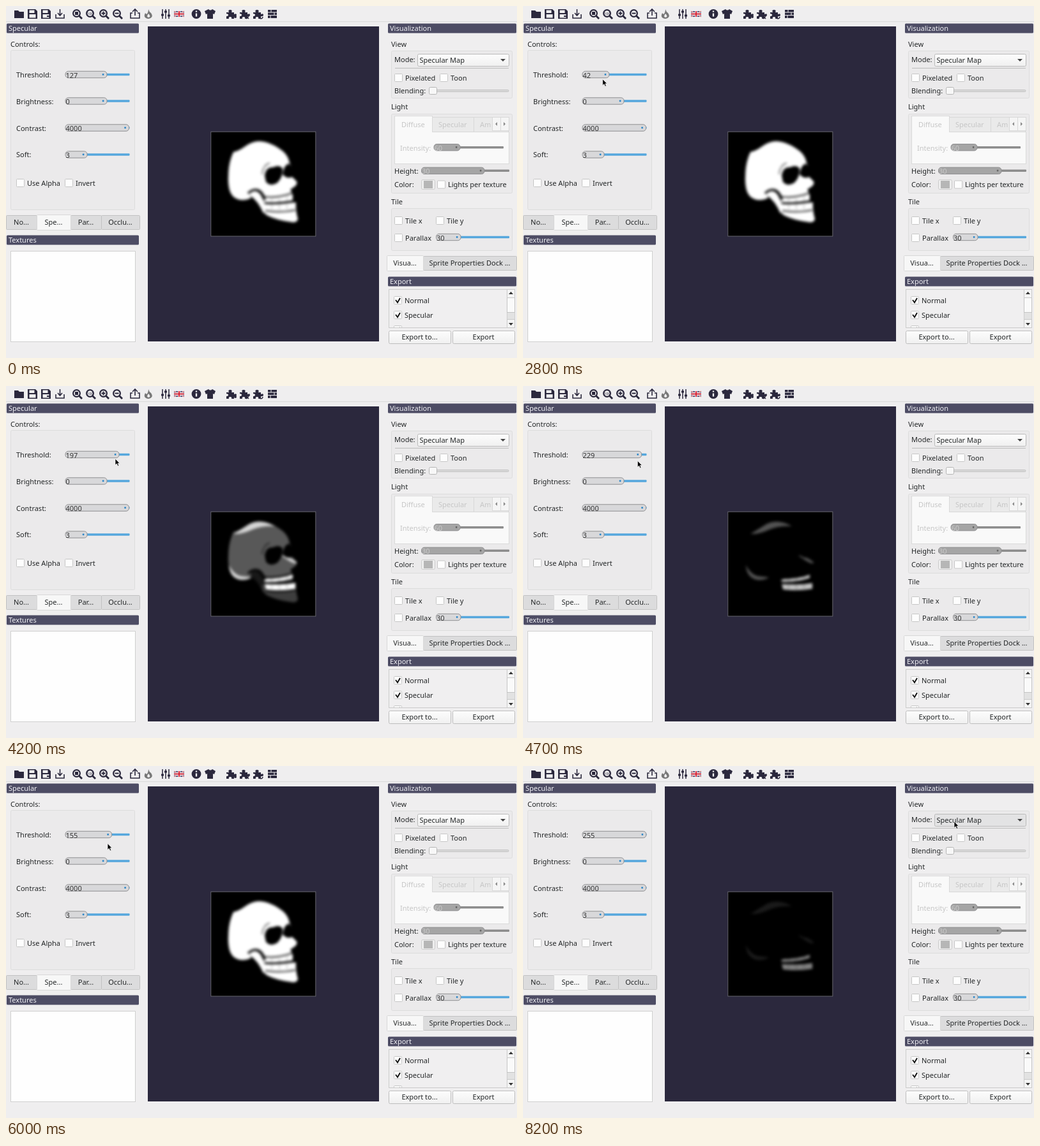
An HTML page that plays this animation: 800x552 px, repeating every 8300 ms.

```html
<!DOCTYPE html>
<html lang="en">
<head>
<meta charset="utf-8">
<title>Specular map threshold</title>
<style>
  html, body { margin: 0; width: 100%; height: 100%; overflow: hidden; background: #efeeef; }
  svg { display: block; width: 100%; height: 100%; }
  text { font: 11px "Noto Sans", sans-serif; fill: #232627; white-space: pre; }
</style>
</head>
<body>
<svg id="stage" viewBox="0 0 800 552" xmlns="http://www.w3.org/2000/svg"></svg>
<script>
const LOOP = 8300, STEP = 100;
const INK = '#2b283d', BLUE = '#55a7dd', PAPER = '#efeeef', PALE = '#c6c6c6';

// ---- markup helpers ----
const rect = (x, y, w, h, fill, stroke = 'none', r = 0, extra = '') =>
  `<rect x="${x}" y="${y}" width="${w}" height="${h}" rx="${r}" fill="${fill}" stroke="${stroke}" ${extra}/>`;
const path = (d, fill = INK, stroke = 'none', width = 1, extra = '') =>
  `<path d="${d}" fill="${fill}" stroke="${stroke}" stroke-width="${width}" ${extra}/>`;
const line = (d, color = INK, width = 1.6, extra = '') => path(d, 'none', color, width, extra);
const circle = (x, y, r, fill, stroke = 'none', width = 1) =>
  `<circle cx="${x}" cy="${y}" r="${r}" fill="${fill}" stroke="${stroke}" stroke-width="${width}"/>`;
const label = (x, y, str, color = '#232627', anchor = 'start') =>
  `<text x="${x}" y="${y}" text-anchor="${anchor}" style="fill:${color}">${str}</text>`;
const group = (x, y, w, h) => rect(x + .5, y + .5, w, h, '#ebeaeb', '#dcdcdc', 2);
const titleBar = (x, y, w, str) => rect(x, y + .5, w, 15, '#4d4c64', 'none', 1.5) + label(x + 3, y + 12, str, '#f1f1f5');
const button = (x, y, w, str) =>
  rect(x + .5, y + .5, w, 20, 'url(#sheen)', '#bdbdbd', 2) + label(x + w / 2, y + 14, str, undefined, 'middle');
const check = (x, y, str, on) => rect(x + .5, y + .5, 12, 12, '#fdfdfd', '#c6c6c6', 1) +
  (on ? line(`M${x + 3} ${y + 6}l3 4 4-7`, '#111', 1.9) : '') + label(x + 17, y + 10.5, str);
const tab = (x, y, w, h, str, selected) =>
  rect(x + .5, y + .5, w, h, selected ? '#f7f7f7' : '#dcdcdd', selected ? '#d8d8d8' : '#c2c2c2', 1) +
  label(x + w / 2, y + (selected ? 16 : 15), str, undefined, 'middle');

// Slider with its value written inside the filled capsule
function slider(id, x, y, end, dot, value, disabled) {
  const tint = disabled ? '#8c8c8c' : BLUE;
  return `<g id="${id}">` + rect(x + 4, y - 1.7, end - x - 4, 3.4, tint, 'none', 1) +
    rect(x, y - 5.2, dot + 6 - x, 10.4, disabled ? '#a5a5a5' : '#d8d8da', '#8f8f91', 4.5, 'class="capsule"') +
    rect(dot - 1.2, y - 1.6, 2.6, 2.8, disabled ? '#666' : '#2c86c8', 'none', .8, 'class="dot"') +
    `<text x="${x + .5}" y="${y + 5}" style="fill:${disabled ? '#c9c9c9' : '#333'}">${value}</text></g>`;
}

// ---- toolbar ----
const floppy = x => path(`M${x} 5h12l3 3v12h-15z`) + rect(x + 2.5, 6.5, 8, 4.5, PAPER) +
  rect(x + 2.5, 13, 10, 5.5, PAPER);
const lens = x => circle(x + 6.5, 11.5, 5.4, 'none', INK, 2.2) + line(`M${x + 10.5} 15.500l4.500 4.500`, INK, 2.8);
const puzzle = x => path(`M${x} 10h4q-2-4 2-4t2 4h4v3q4-2 4 1t-4 2v4h-4q1-3-2-3t-2 3h-4v-4q3 0 3-2t-3-2z`);
const toolbar = () =>
  path('M13 7h6l2 2h7v10h-15z') +
  floppy(34) + floppy(55) + line('M64 16h6', INK, 2) +
  line('M78 13v6h13v-6M84.500 5v9M81 11l3.500 4 3.500-4') +
  [104, 125, 146, 167].map(lens).join('') +
  rect(108, 9, 5, 5, INK) + label(126.5, 14, '<tspan font-size="6">100</tspan>', INK) +
  line('M149.500 11.500h6M152.500 8.500v6M170.500 11.500h6', INK, 1.8) +
  line('M198 11h-3v8h14v-8h-3M202 15v-9M198 9l4-4 4 4') +
  path('M223 5q1 4 4 6 5 7-4 9-9-1-5-9l2 2q3-3 3-8z', '#777') + path('M223 12q5 5 0 6-4-1 0-6z', PAPER) +
  line('M245 5v15M250 5v15M255 5v15', INK, 1.5) + line('M243 14h4M248 9h4M253 15h4', INK, 3) +
  rect(263, 8, 16, 9, '#30406f') + line('M263 8l16 9M279 8l-16 9', '#fff', 2) +
  line('M263 8l16 9M279 8l-16 9', '#c33', .8) + line('M271 8v9M263 12.500h16', '#fff', 4) +
  line('M271 8v9M263 12.500h16', '#cf2638', 2.2) +
  circle(298, 12.5, 7.4, INK) + line('M298 11.500v5M298 7.500v2', '#fff', 2.3) +
  path('M317 5q3 3 6 0l5 3-2 5-2-1v8h-9v-8l-2 1-2-5z') +
  [345, 366, 387].map(puzzle).join('') +
  circle(359, 17, 2, INK) + line('M376 16l4 4M380 16l-4 4') + line('M398 14a3 3 0 1 0 4 3', INK, 1.4) +
  rect(410, 6, 14, 13, INK) + line('M410 10h14M410 14.500h14M415 6v4M420 10v4M414 15v4', PAPER, 1);

// ---- docks ----
const leftDock = () =>
  titleBar(1, 27, 207, 'Specular') + label(7, 64, 'Controls:') + group(7, 69, 194, 250) +
  ['Threshold', 'Brightness', 'Contrast', 'Soft'].map((s, i) => label(16, 112 + i * 41.8, s + ':')).join('') +
  slider('threshold', 93, 107.5, 193.5, 152, 127) + slider('brightness', 93, 149, 193.5, 152, 0) +
  slider('contrast', 93, 191, 193.5, 186.5, 4000) + slider('soft', 93, 233, 193.5, 121, 3) +
  check(16, 271, 'Use Alpha') + check(92, 271, 'Invert') +
  tab(0, 328, 48, 22, 'No...') + tab(101, 328, 48, 22, 'Par...') + tab(149, 328, 60, 22, 'Occlu...') +
  tab(48, 327, 53, 24, 'Spe...', true) +
  titleBar(1, 359, 207, 'Textures') + rect(7.5, 384.5, 195, 142, '#fefefe', '#cfcfcf');

const rightDock = () =>
  titleBar(598, 27, 201, 'Visualization') +
  label(603, 64, 'View') + group(603, 70, 189, 74) + label(608, 88, 'Mode:') +
  rect(644.5, 75.5, 143, 19, 'url(#sheen)', '#b9b9b9', 2, 'id="combo"') + label(647.5, 89, 'Specular Map') +
  path('M774 83h8l-4 4z', '#444') + line('M609 97.500h178', '#bcbcbc', 1) +
  check(608, 106, 'Pixelated') + check(679, 106, 'Toon') +
  label(608, 137, 'Blending:') + rect(664, 131.5, 123, 3, '#d8d8d8', '#c4c4c4', 1.5) +
  rect(662.5, 127.5, 12, 11, '#f7f7f7', '#b5b5b5', 2) +
  label(603, 162, 'Light') + group(603, 169, 189, 124) +
  rect(608.5, 197.5, 179, 50, '#f9f9f9', '#dadada') +
  rect(667.5, 174.5, 65, 23, '#eaeaea', '#d8d8d8') + rect(732.5, 174.5, 54, 23, '#eaeaea', '#d8d8d8') +
  rect(608.5, 172.5, 59, 25, '#f9f9f9', '#dadada') + rect(609, 196, 58, 3, '#f9f9f9') +
  label(619, 190, 'Diffuse', PALE) + label(677, 190, 'Specular', PALE) + label(742, 190, 'Am', PALE) +
  rect(761.5, 174.5, 13, 21, '#f5f5f5', '#d8d8d8') + rect(774.5, 174.5, 13, 21, '#f5f5f5', '#d8d8d8') +
  path('M769 182v6l-3-3z', '#888') + path('M779 182v6l3-3z', '#888') +
  label(617, 226.5, 'Intensity:', PALE) + slider('intensity', 670, 221.7, 779, 705, 60, true) +
  label(608, 263, 'Height:') + slider('height', 650.5, 258.3, 788, 743, 30, true) +
  label(608, 284, 'Color:') + rect(650.5, 272.5, 21, 15, '#eee', '#ccc', 2) + rect(654, 274, 14, 12, '#b6b6b6') +
  check(675, 273.5, 'Lights per texture') +
  label(603, 311, 'Tile') + group(603, 317, 189, 66) +
  check(608, 330, 'Tile x') + check(673, 330, 'Tile y') +
  check(608, 357, 'Parallax') + slider('parallax', 673.5, 362.5, 788, 706, 30) +
  tab(653, 392, 146, 22, 'Sprite Properties Dock ...') + tab(596, 391, 57, 24, 'Visua...', true) +
  titleBar(598, 424, 201, 'Export') +
  rect(599.5, 444.5, 197, 60, '#f0eff0', '#cccccc') +
  `<g clip-path="url(#list)">` + check(607, 455, 'Normal', true) + check(607, 478, 'Specular', true) +
  check(607, 501, '', true) + '</g>' +
  rect(784.5, 444.5, 12, 60, '#e2e2e2', '#cfcfcf') + rect(784.5, 457.5, 12, 23, '#fafafa', '#c4c4c4') +
  rect(784.5, 444.5, 12, 13, '#f5f5f5', '#c9c9c9') + rect(784.5, 491.5, 12, 13, '#f5f5f5', '#c9c9c9') +
  path('M787 452h7l-3.500-4z', '#333') + path('M787 497h7l-3.500 4z', '#333') +
  button(599, 509, 97, 'Export to...') + button(699, 509, 97, 'Export');

// ---- specular preview ----
const preview = () => rect(222, 32, 362, 494, INK) +
  rect(320.8, 197.2, 164, 163.8, '#000', '#65646c') +
  `<g filter="url(#soften)">` +
  path('M382 292Q391 287 398 295Q404 305 408 318L403 325Q395 306 382 297Z', '#fff', 'none', 1, 'id="ramus"') +
  path('M403 311L454 308Q453 320 457 334Q456 340 448 339Q424 336 410 329Q402 325 400 314Z',
    '#fff', 'none', 1, 'id="jaw"') +
  path('M356 229Q365 227 373 221Q385 212 397 212Q412 213 427 223Q442 232 444 246Q449 256 445 265L455 275Q457 281 449 285L445 288Q450 294 448 300L450 306 405 309Q404 300 399 292Q391 286 383 291Q386 301 376 302Q362 305 355 298Q347 288 348 268Q348 246 356 229Z',
    '#fff', 'none', 1, 'id="cranium"') +
  `<g id="glints" fill="#fff">` +
  path('M356 232Q371 223 382 216Q400 208 421 220Q401 219 386 225Q369 233 356 232Z', '#fff') +
  path('M349 281Q356 295 367 298L385 300Q379 305 366 304Q350 300 349 281Z', '#fff') +
  path('M432 266Q445 268 455 277Q452 281 432 266Z', '#fff', '#fff', 1) + '</g><g id="teeth">' +
  path('M404 303Q430 303 449 296V301Q430 308 405 307Z', '#fff') +
  path('M405 310Q430 313 453 309V318Q430 322 407 319Z', '#fff') +
  line('M416 301v18M428 301v19M440 298v21', '#000', 1.2, 'opacity=".25"') + '</g><g id="hollows">' +
  path('M405 266Q407 252 418 253Q428 248 433 255Q434 268 425 277Q415 284 407 276Z', '#000') +
  path('M433 264Q435 249 443 247Q451 256 448 268Q440 272 433 264Z', '#000') +
  line('M401 264Q402 250 413 246', '#000', 2, 'opacity=".5"') +
  line('M379 294Q388 285 397 290Q404 296 405 304', '#000', 4, 'opacity=".8"') +
  line('M403 299Q425 302 449 293M406 321Q430 325 453 320', '#000', 2.6, 'opacity=".7"') +
  line('M405 309Q430 311 453 305', '#000', 3.2, 'opacity=".85"') + '</g></g>';

const stage = document.getElementById('stage');
stage.innerHTML = `<defs>
  <linearGradient id="sheen" x2="0" y2="1"><stop stop-color="#fdfdfd"/><stop offset="1" stop-color="#f0f0f0"/></linearGradient>
  <filter id="soften" filterUnits="userSpaceOnUse" x="321" y="198" width="163" height="162"
    color-interpolation-filters="sRGB"><feGaussianBlur stdDeviation="1.9"/></filter>
  <clipPath id="list"><rect x="600" y="445" width="184" height="59"/></clipPath></defs>` +
  rect(0, 0, 800, 552, PAPER) + line('M0 24.500h800', '#dadada', 1) +
  toolbar() + leftDock() + rightDock() + preview() +
  line('M112.500 103v10', '#222', 1, 'id="caret"') +
  path('M0 0V10L2.300 7.800 4 11.500 5.700 10.700 4.100 7.200H7Z', '#000', '#fff', .7, 'id="pointer"');

// ---- motion: time, pointer x, pointer y, threshold ----
const KEYS = [
  [500, 721, 422, 127], [900, 400, 230, 127], [1300, 184, 113, 127], [1500, 150, 108, 127],
  [2200, 150, 108, 127], [3100, 112, 118, 0], [3200, 111, 118, 0], [3300, 111, 118, 0],
  [3700, 145, 111, 109], [4200, 171, 114, 197], [4800, 181, 118, 235], [5000, 181, 118, 235],
  [5600, 173, 120, 204], [5800, 163, 121, 170], [6200, 155, 122, 140], [6700, 173, 123, 204],
  [7200, 196, 127, 255], [7500, 196, 127, 255], [7800, 430, 106, 255], [8000, 620, 91, 255], [8200, 675, 87, 255]
];
function sample(t) {
  const i = KEYS.findIndex(key => key[0] > t);
  if (i === 0) return KEYS[0];
  if (i < 0) return KEYS[KEYS.length - 1];
  const a = KEYS[i - 1], b = KEYS[i], k = (t - a[0]) / (b[0] - a[0]);
  return a.map((v, n) => v + (b[n] - v) * k);
}

const $ = id => document.getElementById(id);
const setGray = (id, v) => $(id).setAttribute('fill', `rgb(${v},${v},${v})`);

function shadeSkull(threshold) {
  const white = threshold < 175, mid = !white && threshold <= 200;
  const fade = Math.max(0, Math.min(1, (threshold - 205) / 50));
  setGray('cranium', white ? 255 : mid ? 88 : 0);
  setGray('jaw', white ? 255 : mid ? 62 : 0);
  setGray('ramus', white ? 255 : mid ? 24 : 0);
  $('glints').setAttribute('opacity', white ? 1 : mid ? .75 : .44 - .34 * fade);
  $('teeth').setAttribute('opacity', white || mid ? 1 : .9 - .4 * fade);
  $('hollows').setAttribute('opacity', Math.min(1, .25 + threshold / 60));
}

function render(now) {
  const t = Math.floor(now % LOOP / STEP) * STEP;
  const [, x, y, value] = sample(t);
  const dot = 117.3 + value * .2725;
  const bar = $('threshold');
  bar.querySelector('.capsule').setAttribute('width', dot + 6 - 93);
  bar.querySelector('.dot').setAttribute('x', dot - 1.2);
  bar.querySelector('text').textContent = Math.round(value);
  shadeSkull(sample(t - STEP)[3]);
  $('caret').setAttribute('visibility', t >= 1700 && t < 2300 ? 'visible' : 'hidden');
  $('pointer').setAttribute('visibility', t >= 500 ? 'visible' : 'hidden');
  $('pointer').setAttribute('transform', `translate(${x} ${y})`);
  $('combo').setAttribute('fill', t > 7500 && x > 644 ? '#e3e3e4' : 'url(#sheen)');
}

let start;
function tick(now) {
  start ??= now;
  render(now - start);
  requestAnimationFrame(tick);
}
render(0);
requestAnimationFrame(tick);
</script>
</body>
</html>
```
